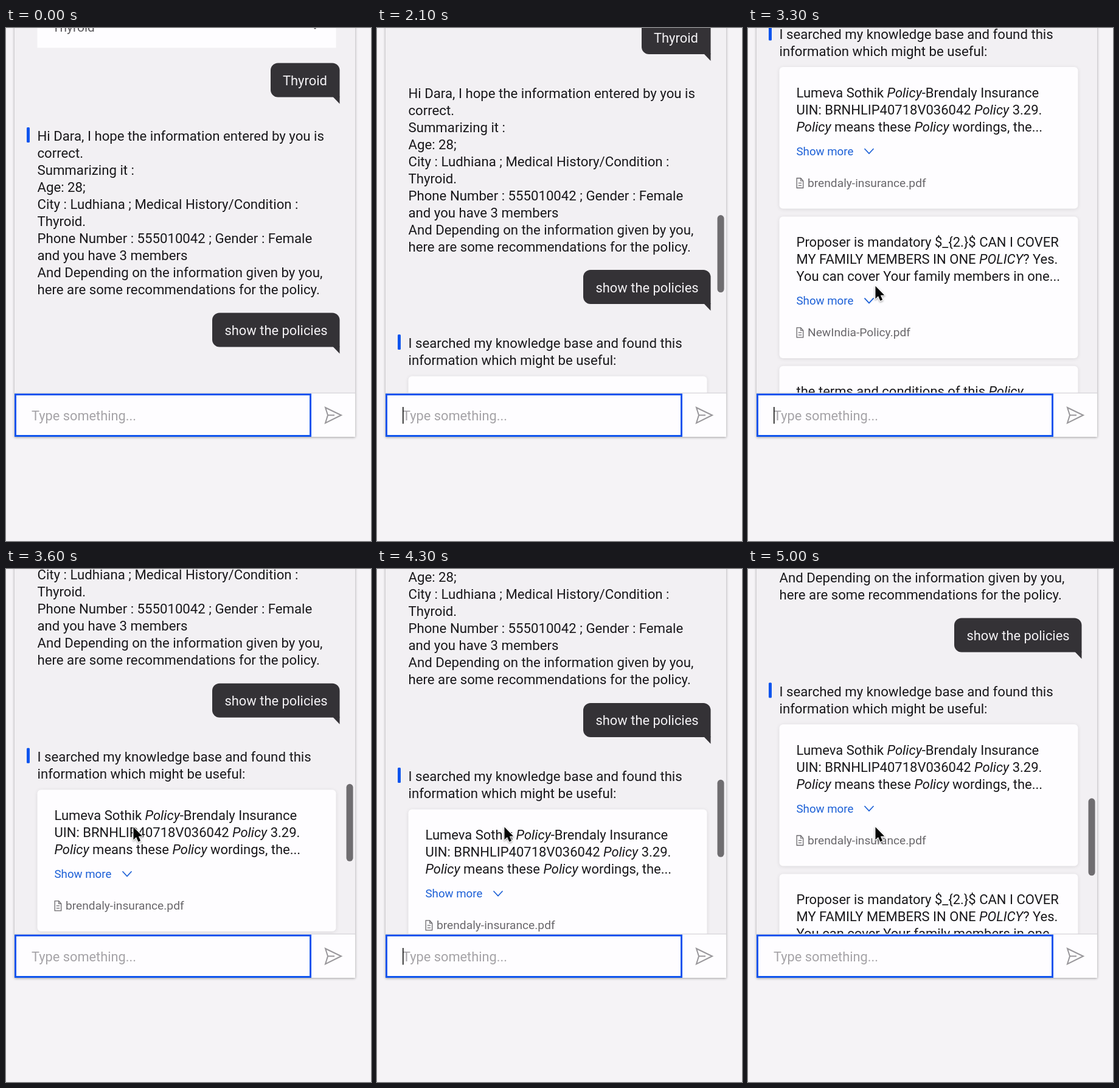
An HTML page with a canvas for the animation above (5100 ms loop, 600 px wide and 842 px high).

```html
<!DOCTYPE html>
<html lang="en">
<head>
<meta charset="utf-8">
<title>Policy chat</title>
<style>
  html, body { margin: 0; width: 100%; height: 100%; overflow: hidden; background: #f5f3f6; }
  canvas { display: block; width: 600px; height: 842px; }
</style>
</head>
<body>
<canvas id="stage"></canvas>
<script>
const W = 600, H = 842, LOOP = 5100, STEP = 100;
const VIEW_BOTTOM = 599, ANSWER = 2100;
const canvas = document.getElementById('stage');
const ctx = canvas.getContext('2d');
const dpr = window.devicePixelRatio || 1;
canvas.width = W * dpr;
canvas.height = H * dpr;

const BLUE = '#0f55ee', LINK = '#1b5fd6', INK = '#19181b', GREY = '#69676b';
const FAMILY = 'Roboto, "Noto Sans", sans-serif';
const BODY = 22.2, CARD_TEXT = 22, LINE = 28;

const summary = [
  'Hi Dara, I hope the information entered by you is',
  'correct.',
  'Summarizing it :',
  'Age: 28;',
  'City : Ludhiana ; Medical History/Condition :',
  'Thyroid.',
  'Phone Number : 555010042 ; Gender : Female',
  'and you have 3 members',
  'And Depending on the information given by you,',
  'here are some recommendations for the policy.'
];
const found = [
  'I searched my knowledge base and found this',
  'information which might be useful:'
];
// Asterisks switch italics on and off.
const cards = [
  { file: 'brendaly-insurance.pdf', lines: [
    'Lumeva Sothik *Policy*-Brendaly Insurance',
    'UIN: BRNHLIP40718V036042 *Policy* 3.29.',
    '*Policy* means these *Policy* wordings, the...'] },
  { file: 'NewIndia-Policy.pdf', lines: [
    'Proposer is mandatory $_{2.}$ CAN I COVER',
    'MY FAMILY MEMBERS IN ONE *POLICY*? Yes.',
    'You can cover Your family members in one...'] },
  { file: '', lines: ['the terms and conditions of this *Policy*'] }
];

const smooth = u => u * u * (3 - 2 * u);
const easeOut = u => u * (2 - u);

// Each key: time, value, easing of the way to it.
const scrollKeys = [
  [50, 0], [150, 37, smooth],
  [2050, 37], [2380, 578, smooth],
  [3300, 578], [4100, 88.5, easeOut], [4600, 337, easeOut],
  [4800, 337], [5000, 387, easeOut]
];
const mouseX = [[2400, 280], [3300, 209, smooth]];
const mouseY = [[2400, 496], [3300, 423, smooth]];

const clamp = v => Math.min(1, Math.max(0, v));
const ramp = (t, a, b) => clamp((t - a) / (b - a));

function track(keys, t) {
  if (t <= keys[0][0]) return keys[0][1];
  for (let i = 1; i < keys.length; i++) {
    const [t0, v0] = keys[i - 1], [t1, v1, ease = smooth] = keys[i];
    if (t <= t1) return v0 + (v1 - v0) * ease((t - t0) / (t1 - t0));
  }
  return keys[keys.length - 1][1];
}

function text(str, x, y, size = BODY, color = INK) {
  ctx.fillStyle = color;
  str.split('*').forEach((part, i) => {
    ctx.font = `${i % 2 ? 'italic ' : ''}400 ${size}px ${FAMILY}`;
    ctx.fillText(part, x, y);
    x += ctx.measureText(part).width;
  });
}

function box(x, y, w, h, r, color) {
  ctx.fillStyle = color;
  ctx.beginPath();
  ctx.roundRect(x, y, w, h, r);
  ctx.fill();
}

function path(points, closed) {
  ctx.beginPath();
  points.forEach(([x, y]) => ctx.lineTo(x, y));
  if (closed) ctx.closePath();
}

function stroke(points, color, width, closed) {
  path(points, closed);
  ctx.strokeStyle = color;
  ctx.lineWidth = width;
  ctx.stroke();
}

function shadow(color, blur, dy) {
  ctx.shadowColor = color;
  ctx.shadowBlur = blur * dpr;
  ctx.shadowOffsetY = dy * dpr;
}

function bubble(str, x, y, textX) {
  const right = 548.5, bottom = y + 56;
  box(x, y, right - x, 56, [12, 12, 0, 12], '#343236');
  path([[537, bottom - 1], [right, bottom - 1], [right, bottom + 11]], true);
  ctx.fill();
  text(str, textX, y + 36.5, BODY - 0.3, '#f4f2f5');
}

function chevron(x, y, color) {
  stroke([[x - 7.5, y - 4], [x, y + 4], [x + 7.5, y - 4]], color, 1.7);
}

function docIcon(x, y) {
  stroke([[x, y], [x + 6.5, y], [x + 10.5, y + 4.5], [x + 10.5, y + 16], [x, y + 16]], GREY, 1.3, true);
  stroke([[x + 6.5, y], [x + 6.5, y + 4.5], [x + 10.5, y + 4.5]], GREY, 1.2);
  for (const dy of [8, 12]) stroke([[x + 2.5, y + dy], [x + 8, y + dy]], GREY, 1.2);
}

function card(data, y) {
  ctx.save();
  shadow('rgba(0,0,0,0.10)', 6, 1);
  box(51.5, y, 491, 232.5, 6, '#fefdff');
  ctx.restore();
  data.lines.forEach((line, i) => text(line, 79.5, y + 49.5 + i * LINE, CARD_TEXT));
  text('Show more', 79.5, y + 144.5, 18.7, LINK);
  chevron(199, y + 138, LINK);
  docIcon(80.2, y + 182.5);
  text(data.file, 98, y + 197, 19.2, GREY);
}

function messages(t) {
  const answered = t >= ANSWER;
  box(51.5, -40, 491, 72.5, 0, '#fefdff');
  text('Thyroid', 76, 5.5, 21, '#5c5a5e');
  chevron(508, -3, '#5c5a5e');
  bubble('Thyroid', 435, 57.5, 455);
  summary.forEach((line, i) => text(line, 51.5, 185 + i * LINE));
  bubble('show the policies', 339, 467.5, 359.5);
  box(34, answered ? 573.5 : 163, 5, 25, 1.5, BLUE);
  if (!answered) return;
  found.forEach((line, i) => text(line, 51.5, 595.5 + i * LINE));
  cards.forEach((data, i) => card(data, 642 + i * 245.4));
}

// Two dots grow in turn and shrink away, every 900 ms.
function dots(t) {
  if (t < 600 || t >= ANSWER) return;
  const p = (t - 600) % 900;
  for (let i = 0; i < 2; i++) {
    const size = ramp(p, i * 200 - 100, i * 200 + 200) * (1 - ramp(p, 500, 700));
    ctx.fillStyle = i ? '#2467f2' : '#1560f5';
    ctx.beginPath();
    ctx.arc(63.7 + i * 15.6, 553, 4.9 * size, 0, Math.PI * 2);
    ctx.fill();
  }
}

function scrollbar(t, scroll) {
  const early = t < ANSWER;
  let alpha = 1;
  if (t < 100) alpha = 0;
  else if (early) alpha = 1 - ramp(t, 500, 800);
  else if (t <= 3300) alpha = 1 - ramp(t, 2700, 3000);
  const top = early ? 414 : 291.7 + 0.2186 * scroll;
  ctx.globalAlpha = alpha;
  box(559.5, top, 11, early ? 182 : 127, 5.5, '#6f6d70');
  ctx.globalAlpha = 1;
}

function inputRow(t) {
  box(14, 599, 560, 72, 0, '#fefdff');
  box(14, 598.5, 560, 1.2, 0, '#d6d4d8');
  ctx.strokeStyle = BLUE;
  ctx.lineWidth = 3;
  ctx.strokeRect(15.5, 601.5, 485, 68);
  text('Type something...', 42, 643.5, 21.8, '#a5a3a7');
  const blink = t % 1000;
  if (blink >= 100 && blink < 600) box(42, 622, 1.6, 27.5, 0, '#111');
  const grey = '#98969a';
  stroke([[525, 623], [551, 635.5], [525, 648.3], [529, 635.5]], grey, 2, true);
  stroke([[529, 635.5], [540, 635.5]], grey, 2);
}

function pointer(t) {
  if (t < 2400) return;
  ctx.save();
  ctx.translate(track(mouseX, t), track(mouseY, t));
  ctx.scale(0.95, 0.95);
  path([[0.5, 0.5], [0.5, 22.5], [5.3, 18], [8.8, 26], [12.8, 24.3], [9.4, 16.5], [16, 16.2]], true);
  shadow('rgba(0,0,0,0.35)', 3, 1.5);
  ctx.lineJoin = 'round';
  ctx.lineWidth = 2.6;
  ctx.strokeStyle = '#fff';
  ctx.stroke();
  ctx.shadowColor = 'transparent';
  ctx.fillStyle = '#050505';
  ctx.fill();
  ctx.restore();
}

function draw(t) {
  const scroll = track(scrollKeys, t);
  ctx.setTransform(dpr, 0, 0, dpr, 0, 0);
  box(0, 0, W, H, 0, '#f5f3f6');
  ctx.save();
  shadow('rgba(0,0,0,0.36)', 4, 1);
  box(14, -20, 560, 691, 0, '#f2f0f3');
  ctx.restore();

  ctx.save();
  ctx.beginPath();
  ctx.rect(14, 0, 560, VIEW_BOTTOM);
  ctx.clip();
  ctx.translate(0, -scroll);
  messages(t);
  ctx.restore();

  dots(t);
  scrollbar(t, scroll);
  inputRow(t);
  pointer(t);
}

let start = null;
function tick(now) {
  if (start === null) start = now;
  const t = (now - start) % LOOP;
  draw(Math.floor(t / STEP) * STEP);
  requestAnimationFrame(tick);
}
draw(0);
requestAnimationFrame(tick);
</script>
</body>
</html>
```
